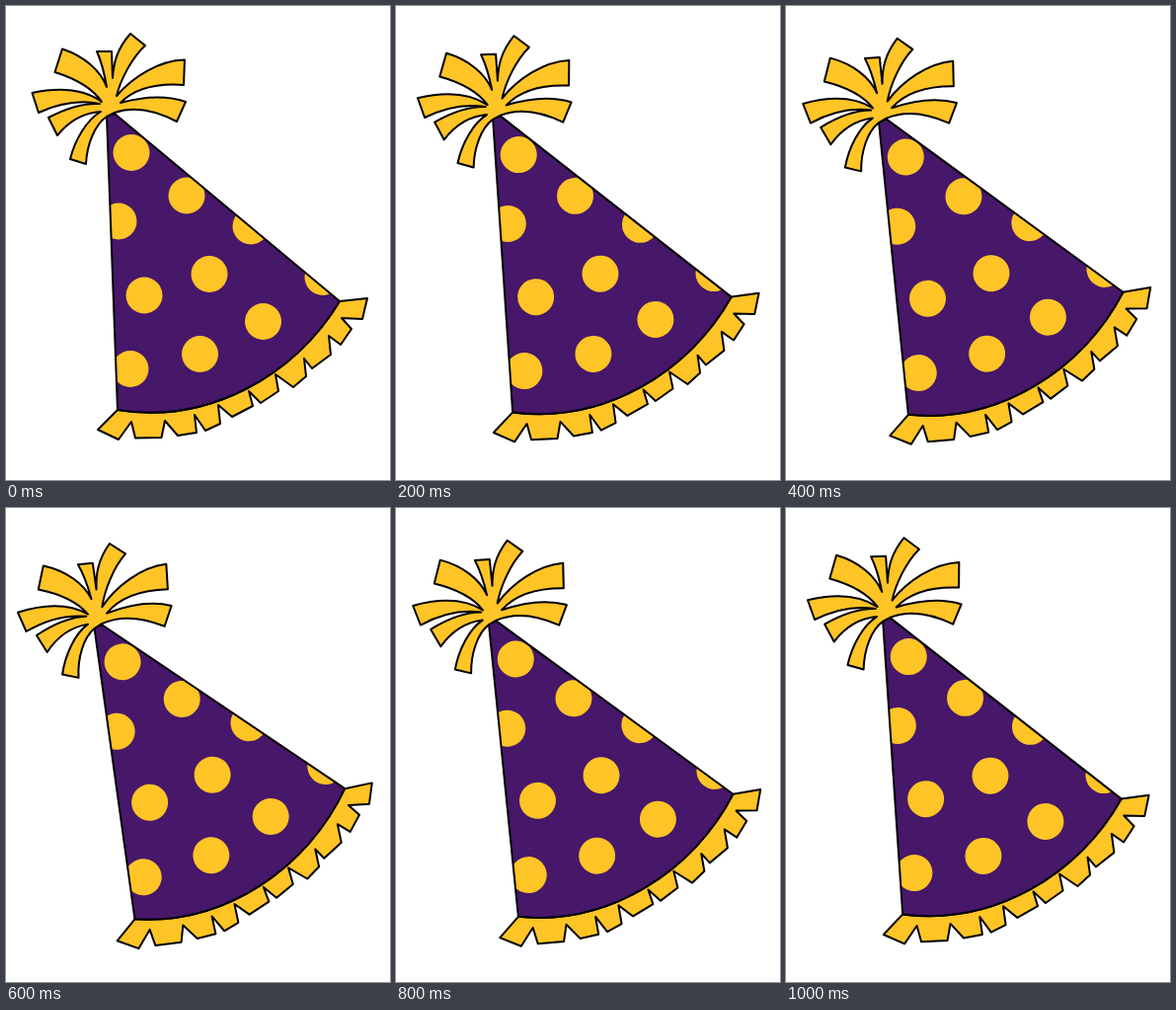
Animation, 389 px wide and 480 px high, one loop 1200 ms. Source, as an HTML page with a canvas:

```html
<!DOCTYPE html>
<html lang="en">
<head>
<meta charset="utf-8">
<title>Party hat</title>
<style>
  html, body { margin: 0; width: 100%; height: 100%; overflow: hidden; background: #fff; }
  canvas { display: block; }
</style>
</head>
<body>
<canvas id="stage" width="389" height="480"></canvas>
<script>
const ctx = document.getElementById('stage').getContext('2d');
const W = 389, H = 480;
const GOLD = '#ffc425', PURPLE = '#47176a', INK = '#000';
const STEP = 200;
const TILT = [0, 1.75, 3.65, 5.8, 3.65, 1.75]; // degrees, counter-clockwise

const cone = new Path2D('M102 111 L113 409 C205 424 293 374 338 299 L110 109 Z');

const fringe = new Path2D(`M113 409 L93 429 L114 439 L127 421 L131 437.5 L157.5 437
  L161 420 L174 435 L193 432 L191 414 L202 430 L217 423 L215 404 L229 416 L250 405
  L246 390 L258 402 L276 390 L273 373 L291 386 L304 375 L302 357 L310 367 L329 353
  L327 334 L339 343 L350 327 L340 316 L361 317 L366 296 L338 299
  C293 374 205 424 113 409 Z`);

const pompom = new Path2D(`M110 108 C130 101 152 106 173 117 L182 97
  C162 90 138 92 116 98 C130 84 152 78 180 80 L181 54.5
  C155 55 128 72 112 91 C116 75 127 53 141 40 L126 28
  C112 44 109 58 108 73 L107 46 L92 46
  C97 57 100 70 102 82 C96 66 80 51 57 43.5 L49.5 67
  C72 74 88 84 97 97 C80 85 55 82 26.5 88 L33 108
  C55 98 75 95 95 99 C78 98 60 104 43 113 L52 131
  C65 115 80 108 96 107 C82 115 70 135 65 155 L81 160
  C82 140 90 120 102 112 Z`);

const dots = [
  [127, 148.5], [183, 192], [114, 218], [248, 223], [206, 271.5],
  [321, 274.5], [140, 293], [260.5, 319.5], [196.5, 352.5], [126, 367.5]
];

function shape(path, fill) {
  ctx.fillStyle = fill;
  ctx.fill(path);
  ctx.stroke(path);
}

function drawDots() {
  ctx.save();
  ctx.clip(cone);
  ctx.fillStyle = GOLD;
  for (const [x, y] of dots) {
    ctx.beginPath();
    ctx.arc(x, y, 18.5, 0, Math.PI * 2);
    ctx.fill();
  }
  ctx.restore();
}

function draw(time) {
  const angle = TILT[Math.floor(time / STEP) % TILT.length];
  ctx.fillStyle = '#fff';
  ctx.fillRect(0, 0, W, H);
  ctx.save();
  ctx.translate(W / 2, H / 2);
  ctx.rotate(-angle * Math.PI / 180);
  ctx.translate(-W / 2, -H / 2);
  ctx.strokeStyle = INK;
  ctx.lineWidth = 2;
  ctx.lineJoin = 'round';
  shape(fringe, GOLD);
  ctx.fillStyle = PURPLE;
  ctx.fill(cone);
  drawDots();
  ctx.stroke(cone);
  shape(pompom, GOLD);
  ctx.restore();
}

const start = performance.now();
function tick() {
  draw(performance.now() - start);
  requestAnimationFrame(tick);
}
tick();
</script>
</body>
</html>
```
